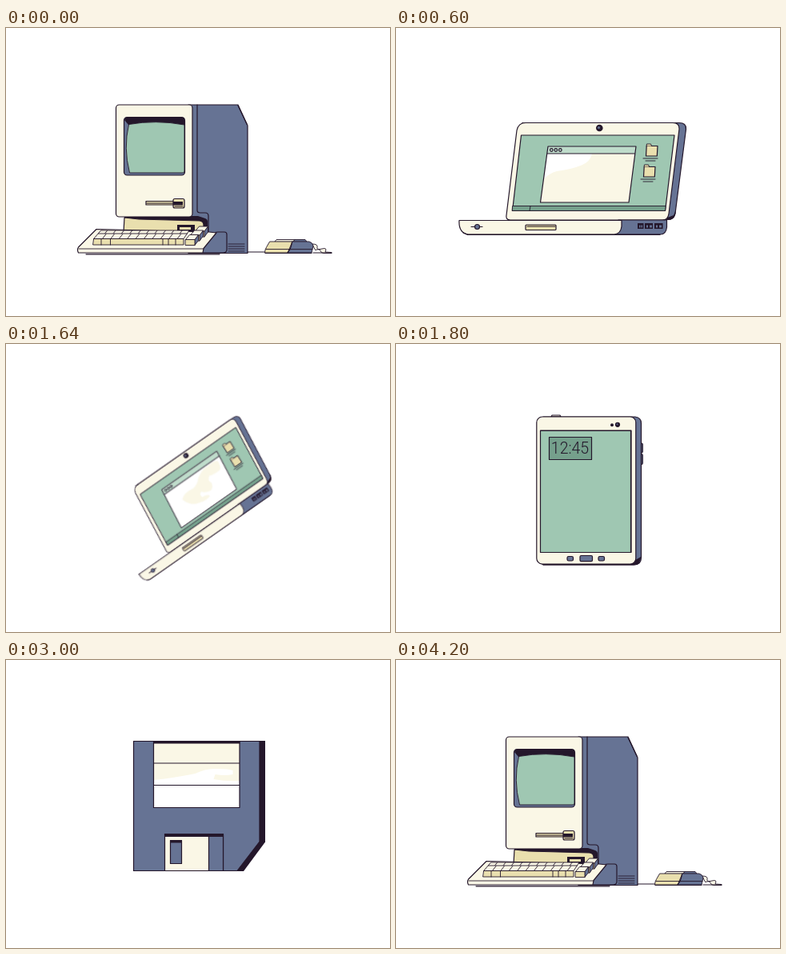
An HTML page without scripts for the animation above (4.8 s loop, 480 by 360 pixels).

```html
<!DOCTYPE html>
<html lang="en">
<head>
<meta charset="utf-8">
<title>Devices</title>
<style>
  html, body { margin: 0; width: 100%; height: 100%; overflow: hidden; background: #fff; }
  svg { display: block; width: 100vw; height: 100vh; }

  svg { stroke-linejoin: round; stroke-linecap: round; }
  .cream { fill: #faf7e6; }
  .tan { fill: #e9dfae; }
  .blue { fill: #667394; }
  .green { fill: #9fc7b2; }
  .moss { fill: #75a08c; }
  .mint { fill: #bfdccb; }
  .white { fill: #fff; }
  .ink { fill: #24172b; }
  .line { stroke: #24172b; stroke-width: 1.2; }
  .thin { stroke: #24172b; stroke-width: .9; }
  .open { fill: none; }
  .dashes { fill: none; stroke-linecap: butt; }
  .clock { font: 300 19.5px Roboto, "Open Sans", sans-serif; text-anchor: middle; fill: #24172b; }

  /* Each device lives for a quarter of the loop: swing in, rest, swing out. */
  .device {
    --a: .985; --b: .94; --c: .865; --d: .76;
    transform-origin: 240px 180px;
    opacity: 0;
    animation: swing 4800ms step-end var(--at) infinite;
  }
  .rest { animation: rest 4800ms step-end var(--at) infinite; }
  .move { animation: move 4800ms step-end var(--at) infinite; }

  #computer { --at: -720ms; --a: .96; --b: .83; --c: .69; --d: .58; }
  #laptop { --at: -4320ms; }
  #phone { --at: -3120ms; }
  #floppy { --at: -1920ms; --a: .832; --b: .7; --c: .6; --d: .52; }

  @keyframes swing {
    0% { opacity: 1; transform: rotate(20deg) scale(var(--c)); }
    .83% { opacity: 1; transform: rotate(9deg) scale(var(--b)); }
    1.66% { opacity: 1; transform: rotate(2.2deg) scale(var(--a)); }
    2.49% { opacity: 1; transform: rotate(0deg) scale(1); }
    21.66% { opacity: 1; transform: rotate(-2.2deg) scale(var(--a)); }
    22.49% { opacity: 1; transform: rotate(-9deg) scale(var(--b)); }
    23.32% { opacity: 1; transform: rotate(-20deg) scale(var(--c)); }
    24.15% { opacity: 1; transform: rotate(-35deg) scale(var(--d)); }
    25%, 100% { opacity: 0; transform: none; }
  }
  @keyframes rest {
    0% { opacity: 0; }
    2.49% { opacity: 1; }
    21.66%, 100% { opacity: 0; }
  }
  @keyframes move {
    0% { opacity: 1; }
    2.49% { opacity: 0; }
    21.66%, 100% { opacity: 1; }
  }
</style>
</head>
<body>
<svg viewBox="0 0 480 360">
  <defs>
    <g id="folder">
      <path class="tan line" d="M.5 15.500L1.200 3H15L14.300 15.500Z"/>
      <path class="tan thin" d="M1.200 3L1.400 .5H6.500L7.500 3"/>
      <path class="open thin" d="M-3 18.500H15M0 21.500H12"/>
    </g>
    <g id="key" class="thin">
      <path class="blue" d="M11.500 0L16-6V1L11.500 7Z"/>
      <path class="cream" d="M0 0L5-6H16L11.500 0Z"/>
      <path class="tan" d="M0 0H11.500V7H0Z"/>
    </g>
  </defs>

  <g id="computer" class="device">
    <!-- ground line, cable, mouse -->
    <path class="open line" stroke-width="1.600" d="M268 280H325"/>
    <path class="cream thin" d="M383 270q7 0 6 4t6 2 4 4l8 .5v1H397q-3 0-4-3t-6-1z"/>
    <path class="open line" d="M384 281H407"/>
    <path class="cream thin" d="M336 267l2-2.500h23l-2 2.500z"/>
    <path class="blue thin" d="M359 267l2-2.500h13l2 2.500z"/>
    <path class="tan thin" d="M330 267H358l-6 14H323.500q0-4 2-7z"/>
    <path class="blue thin" d="M358 267H379q4 1 5 5l-2 9H352l4-7z"/>
    <path class="open thin" d="M325 276.500H354M355 276.500H383M358 267l-3 10-3 4"/>
    <path class="open line" d="M324 281.500H382"/>

    <!-- case -->
    <path class="blue line" d="M228 96H290L302 122V281.500H228Z"/>
    <path class="open line" d="M290 97l11 23M239 96V228q0 3 4 3h6q4 0 4 4v22"/>
    <path class="open thin" d="M278 270H298M278 273H298M278 276H298M278 279H298"/>
    <path class="ink" d="M148 235H240l9 3q3 1 3 4v13H148z"/>
    <path class="tan line" d="M148 237l18 2 76 2q5 1 5 5v9H147z"/>
    <path class="ink" d="M214 246h22v9h-22z"/>
    <path class="tan" d="M217 249h14v3h-14z"/>
    <rect class="cream line" x="137.500" y="96" width="95.500" height="140" rx="4"/>

    <!-- screen and drive slot -->
    <rect class="blue line" x="147.500" y="111.500" width="76" height="72.500" rx="4"/>
    <path class="ink" d="M149 112H223V122Q187 114 153 121L148 115z"/>
    <path class="green thin" d="M153.500 120.500Q187 114.500 223 121V179q0 2-2 2H154.500Q146.500 150 153.500 120.500Z"/>
    <rect class="tan line" x="175" y="216.500" width="35" height="4.500"/>
    <path class="open line" d="M176 219H209"/>
    <rect class="tan line" x="209" y="213.500" width="14" height="11.500" rx="2"/>
    <path class="ink" d="M209 217h12v4.500h-12z"/>
    <path class="open line" d="M211 223H221"/>

    <!-- keyboard -->
    <path class="blue line" d="M244 278L261 256q1-1 4-1h8q3 0 3 3v19q0 4-5 4H244z"/>
    <path class="cream line" d="M113 251.500L254 255 263 256 247 275.500 246 281H90.500q-2-4 0-7z"/>
    <path class="open thin" d="M91 276H247"/>
    <path class="open line" d="M100 282.800H267"/>
    <path class="cream thin" d="M119 253H229L222 263.500H110Z"/>
    <path class="open thin" d="M115.500 257H226.500"/>
    <g transform="translate(110 263.500) skewX(-38)" class="dashes" stroke="#24172b">
      <path stroke-width="6" stroke-dasharray=".9 9.500" d="M10-3.200H108"/>
      <path stroke-width="4" stroke-dasharray=".9 9.500" d="M8-8.500H108"/>
    </g>
    <path class="tan thin" d="M110 263.500H222V271H109Z"/>
    <path class="open thin" d="M119 263.500V271M130.500 263.500V271M196 263.500V271M203 263.500V271M212 263.500V271"/>
    <use href="#key" x="236.500" y="254"/>
    <use href="#key" x="230.500" y="259"/>
    <use href="#key" x="224.500" y="264.500"/>
  </g>

  <g id="laptop" class="device">
    <path class="blue line" d="M158 118.500H354q9 0 8.500 8L349 232q-2 7-9 7.500H300z"/>
    <path class="ink" d="M347 234l3-7-1 7q-2 6-9 6h-8z"/>
    <path class="cream line" d="M162 118.500H346q8.500 0 8 8L341 232q-1 8-8 8H143q-6 0-5-6L151 128q2-9.500 11-9.500Z"/>
    <path class="green line" d="M156.500 134H348L336.500 228.500H145.500Z"/>
    <path class="moss thin" d="M146 222.500H337.200L336.500 228.500H145.500ZM168 222.500L167 228.500"/>

    <path class="cream" d="M190 148H300L291 218H180.500Z"/>
    <path class="white rest" d="M188.500 157H245q-2 10-13 14.500t-31 7.500q-8 2-15.500 9z"/>
    <g class="move">
      <path class="white" d="M188.500 157H298.500L291 218H180.500Z"/>
      <path class="cream" d="M208 181q8-8 25-5 10-1 17-9 13-9 23-7 17-2 19 3-1 10-5 13-15 1-20-2-8 4-4 12-2 9-9 9-9-1-13-7-6 1-4 8 14 2 11 6-9 3-20-1-15-3-20-20z"/>
    </g>
    <path class="mint" d="M190 148H300L298.800 157H188.600Z"/>
    <path class="open line" d="M190 148H300L291 218H180.500ZM188.600 157H298.800"/>
    <g class="mint line">
      <circle cx="194.300" cy="152.500" r="1.800"/>
      <circle cx="199.800" cy="152.500" r="1.800"/>
      <circle cx="205.300" cy="152.500" r="1.800"/>
    </g>
    <use href="#folder" x="312" y="144.500"/>
    <use href="#folder" x="309" y="170.500"/>
    <circle class="ink" cx="254.300" cy="125" r="4.300"/>
    <circle class="blue" cx="253.500" cy="124.500" r="1.600"/>

    <!-- base -->
    <path class="blue line" d="M278 240H338.500V249q-1 9-8 9H270z"/>
    <path class="cream line" d="M79 240.500H282V248q-1 9-9 10H90q-12-2-11-17.500Z"/>
    <path class="open line" d="M84 256l5 2.300H330" stroke-width="2"/>
    <path class="open line" d="M94 248.500H108"/>
    <circle class="blue line" cx="101.500" cy="248.500" r="3"/>
    <rect class="tan line" x="162" y="246" width="38" height="6.500" rx="1"/>
    <path class="open line" d="M164 248H199"/>
    <path class="ink" d="M302 244h7.500v7H302zM311 244h10v7H311zM323 244h10.500v7H323z"/>
    <path class="dashes" stroke="#667394" stroke-width="3" d="M304 248h1.500m1 0h1.500M313 248h2m2 0h3M325 248h2m2 0h3"/>
  </g>

  <g id="phone" class="device">
    <path class="cream line" d="M194 91l1-2h10l1 2z"/>
    <rect class="blue line" x="304" y="124" width="4.300" height="12" rx="1.500"/>
    <rect class="blue line" x="304" y="137.500" width="4.300" height="13" rx="1.500"/>
    <path class="blue line" d="M184 91H299q7.500 1 7.500 8V267q0 9-9 9H184z"/>
    <path class="ink" d="M296 272l10-6q0 10-9 10.500H184l-7-4z"/>
    <rect class="cream line" x="175.800" y="91" width="124" height="184" rx="7"/>
    <path class="green line" d="M180.500 108H294V260.500H180.500Z"/>
    <path class="open line" d="M181 108.500H293.500V260"/>
    <rect class="moss line" x="191.500" y="116.500" width="53" height="28"/>
    <text class="clock" x="217.500" y="136.500">12:45</text>
    <circle class="ink" cx="270" cy="101.300" r="2"/>
    <circle class="ink" cx="277" cy="100.800" r="3.100"/>
    <circle class="blue" cx="276.500" cy="100.300" r="1"/>
    <g class="blue line">
      <rect x="214" y="265.500" width="7.500" height="5.500" rx="1.800"/>
      <rect x="230" y="264.500" width="15.500" height="7.200" rx="1.500"/>
      <rect x="253" y="265.500" width="7.500" height="5.500" rx="1.800"/>
    </g>
  </g>

  <g id="floppy" class="device">
    <path class="ink" d="M290 101H324V227.500L297 264H285z"/>
    <path class="blue line" d="M159.500 101.500H317V227L289 263.500H159.500Z"/>
    <path class="cream" d="M184.500 102H292V184.500H184.500Z"/>
    <path class="white rest" d="M184.500 150q28-3 52-8 14-7 27-6 15 0 20 2v5q-10 2-22 0l-2 6q16 3 32.500 2V184.500H184.500z"/>
    <path class="white move" d="M184.500 129H240l-4 7-13 3q-4 15 9 20 14 10 12 25.500H184.500z"/>
    <path class="open line" d="M184.500 102V184.500H292V102M184.500 129H292M184.500 156.500H292"/>
    <path class="ink" d="M184 101H292.500V104.500H184z"/>
    <path class="cream line" d="M198.500 217.500H271.500V263.500H198.500Z"/>
    <path class="white move" d="M221 227h17q-14 8-7 14 10 7 21 5v-20l-8-4h-23z"/>
    <path class="blue line" d="M253.500 219H271.500V263.500H253.500Z"/>
    <path class="ink" d="M198.500 217H272V221H198.500z"/>
    <path class="blue line" d="M205.500 225.500H219.500V254.500H205.500Z"/>
    <path class="ink" d="M205 225H220V228.500H205z"/>
  </g>
</svg>
</body>
</html>
```
